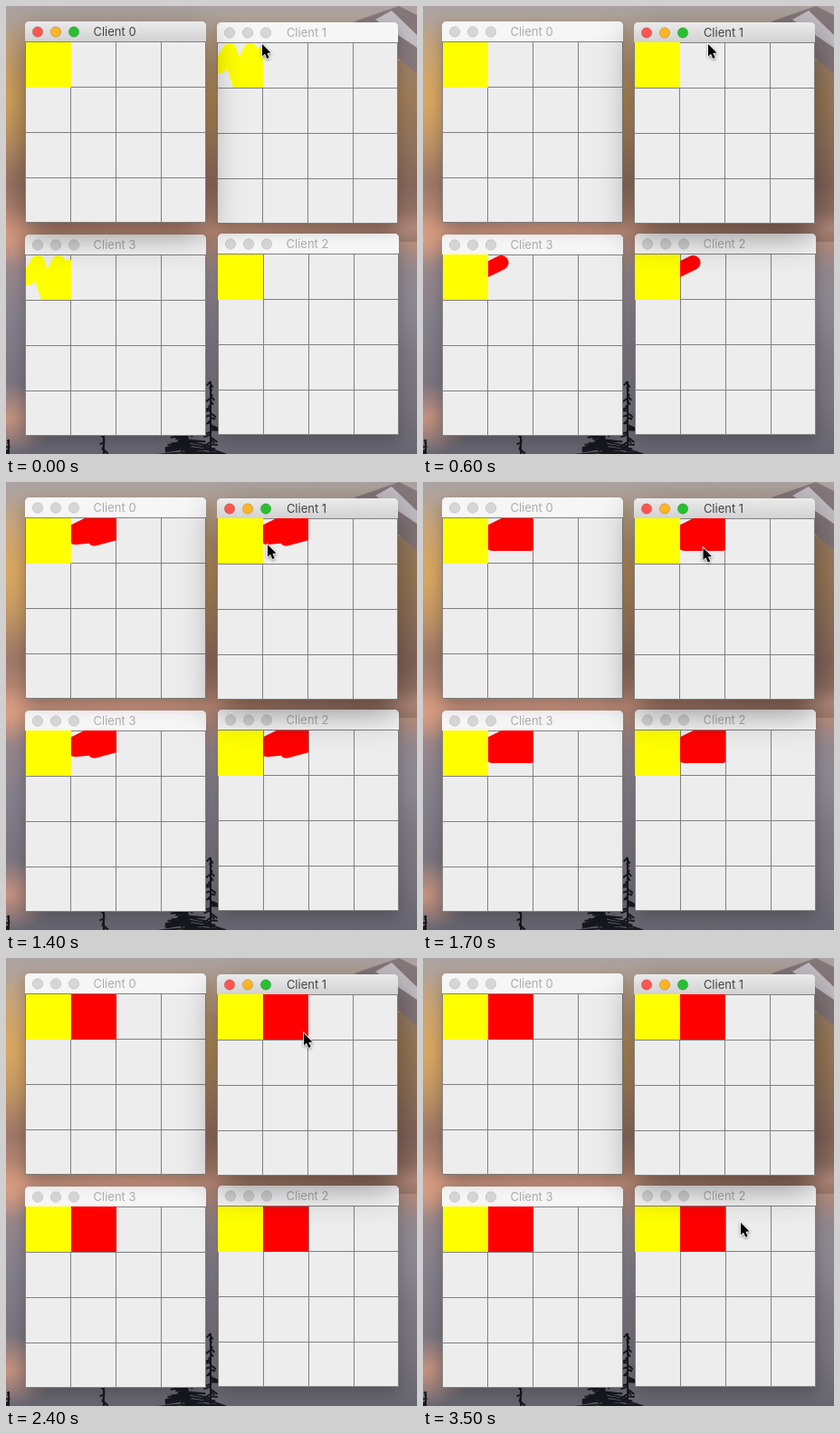
An HTML page with a canvas for the animation above (3600 ms loop, 454 by 494 pixels).

```html
<!DOCTYPE html>
<html lang="en">
<head>
<meta charset="utf-8">
<title>Shared drawing clients</title>
<style>
html, body { margin: 0; width: 100%; height: 100%; overflow: hidden; }
canvas { display: block; }
</style>
</head>
<body>
<canvas id="stage" width="454" height="494"></canvas>
<script>
const W = 454, H = 494, LOOP = 3600, STEP = 100;
const CELL = 50, SIZE = CELL * 4, BAR = 22, BRUSH = 16;
const PRESS_AT = 400, REPAINT_AT = 700, FILL_AT = 2300, LAG = 100;
const ctx = document.getElementById('stage').getContext('2d');

// dx, dy: where the cell fill starts, on or just after the grid line
const clients = [
  { x: 21, y: 17, dx: 1, dy: 1 },
  { x: 233, y: 18, dx: 1, dy: 0 },
  { x: 234, y: 251, dx: 0, dy: 1 },
  { x: 21, y: 252, dx: 1, dy: 0 }
];

// Pointer stops { t, x, y } relative to the red cell: approach, zigzag, leave
const stop = (t, x, y) => ({ t, x, y });
const stops = [stop(0, -1, 1), stop(PRESS_AT, -2, 17), stop(600, 31, 1)];
for (let i = 0; i < 7; i++) {
  const row = i >> 1;
  stops.push(i % 2
    ? stop(800 + 200 * i, 5, 21 + 7 * row)
    : stop(800 + 200 * i, 46, 6 + 11 * row));
}
stops.push(stop(2400, 45, 42), stop(3000, 77, 240), stop(LOOP, 65, 253));

const scribble = [[3, 26], [13, 9], [22, 40], [36, 9], [24, 46], [48, 14], [44, 49], [30, 47]];

function pointer(t) {
  const i = Math.max(1, stops.findIndex(s => s.t >= t));
  const a = stops[i - 1], b = stops[i], u = (t - a.t) / (b.t - a.t);
  return [a.x + (b.x - a.x) * u, a.y + (b.y - a.y) * u];
}

function trail(t) {
  const passed = stops.filter(s => s.t >= PRESS_AT && s.t <= t);
  return [...passed.map(s => [s.x, s.y]), pointer(t)];
}

function trace(points) {
  ctx.beginPath();
  points.forEach(p => ctx.lineTo(...p));
}

function polygon(points, color) {
  trace(points);
  ctx.closePath();
  ctx.fillStyle = color;
  ctx.fill();
}

function brush(points, color) {
  trace(points);
  ctx.lineWidth = BRUSH;
  ctx.lineCap = ctx.lineJoin = 'round';
  ctx.strokeStyle = color;
  ctx.stroke();
}

function gradient(x, y, x2, y2, colors) {
  const g = ctx.createLinearGradient(x, y, x2, y2);
  colors.forEach((c, i) => g.addColorStop(i / (colors.length - 1), c));
  return g;
}

function glow(x, y, rx, ry, rgb) {
  ctx.save();
  ctx.translate(x, y);
  ctx.scale(rx, ry);
  const g = ctx.createRadialGradient(0, 0, 0, 0, 0, 1);
  g.addColorStop(0, `rgba(${rgb},.8)`);
  g.addColorStop(1, `rgba(${rgb},0)`);
  ctx.fillStyle = g;
  ctx.fillRect(-1, -1, 2, 2);
  ctx.restore();
}

// Fir shape: random twigs that widen from the tip downwards
function tree(x, top, spread, twigs) {
  let seed = x;
  const random = () => (seed = seed * 16807 % 2147483647) / 2147483647;
  ctx.beginPath();
  ctx.moveTo(x, top);
  ctx.lineTo(x, H);
  for (let i = 0; i < twigs; i++) {
    const y = top + (H - top) * i / twigs;
    const reach = (random() * 2 - 1) * spread * (.3 + i / twigs);
    ctx.moveTo(x, y);
    ctx.lineTo(x + reach, y + random() * 6);
  }
  ctx.lineWidth = 2;
  ctx.lineCap = 'butt';
  ctx.strokeStyle = '#17181f';
  ctx.stroke();
}

function backdrop() {
  ctx.fillStyle = gradient(0, 0, 0, H, ['#aaa3a3', '#c2a382', '#c79a62', '#b58c66', '#a07868',
    '#c29079', '#95868c', '#85808b', '#7d7782', '#76727d', '#666570']);
  ctx.fillRect(0, 0, W, H);
  ctx.fillStyle = gradient(200, 0, W, 0, ['rgba(92,76,74,0)', 'rgba(92,76,74,.4)']);
  ctx.fillRect(0, 60, W, 200);
  glow(5, 100, 45, 80, '222,172,98');
  glow(0, 255, 45, 32, '226,162,130');
  glow(140, 245, 110, 18, '208,152,130');
  glow(450, 245, 40, 20, '182,140,126');
  glow(448, 320, 45, 60, '142,138,148');
  glow(0, 455, 60, 40, '222,156,126');
  polygon([[385, 17], [434, 0], [W, 10], [W, 75]], '#85777a');
  polygon([[408, 15], [426, 5], [W, 32], [W, 46]], '#c3bec4');
  tree(226, 414, 14, 30);
  tree(200, 466, 38, 60);
  tree(108, 474, 8, 8);
  tree(3, 478, 5, 6);
}

function inCell(client, column, draw) {
  ctx.save();
  ctx.translate(column * CELL + client.dx, BAR + client.dy);
  ctx.beginPath();
  ctx.rect(0, 0, CELL, CELL);
  ctx.clip();
  draw();
  ctx.restore();
}

function fillCell(color) {
  ctx.fillStyle = color;
  ctx.fillRect(0, 0, CELL, CELL);
}

function drawFrame(active) {
  ctx.save();
  ctx.shadowColor = `rgba(0,0,0,${active ? .45 : .25})`;
  ctx.shadowBlur = active ? 38 : 18;
  ctx.shadowOffsetY = active ? 13 : 6;
  ctx.beginPath();
  ctx.roundRect(0, 0, SIZE, SIZE + BAR, [5, 5, 2, 2]);
  ctx.fillStyle = '#ededed';
  ctx.fill();
  ctx.restore();

  ctx.beginPath();
  ctx.roundRect(0, 0, SIZE, BAR, [5, 5, 0, 0]);
  ctx.fillStyle = active ? gradient(0, 0, 0, BAR, ['#ebebeb', '#d2d2d2']) : '#f6f6f6';
  ctx.fill();

  ['#fc5650', '#fdb424', '#28c032'].forEach((color, i) => {
    ctx.beginPath();
    ctx.arc(14 + 20 * i, 11.5, 5.7, 0, 7);
    ctx.fillStyle = active ? color : '#d6d6d6';
    ctx.fill();
    ctx.lineWidth = .8;
    ctx.strokeStyle = active ? 'rgba(0,0,0,.2)' : '#c4c4c4';
    ctx.stroke();
  });

  ctx.fillStyle = '#808080';
  for (let i = 0; i <= 4; i++) {
    const line = Math.min(i * CELL, SIZE - 1);
    ctx.fillRect(line, BAR, 1, SIZE);
    ctx.fillRect(0, BAR + line, SIZE, 1);
  }
}

function drawWindow(index, active, t) {
  const client = clients[index];
  ctx.save();
  ctx.translate(client.x, client.y);
  drawFrame(active);

  ctx.font = '13px Inter, sans-serif';
  ctx.textAlign = 'center';
  ctx.textBaseline = 'middle';
  ctx.fillStyle = active ? '#444' : '#acacac';
  ctx.fillText('Client ' + index, SIZE / 2 - 1, 12);

  // Odd clients receive the yellow fill one step late
  inCell(client, 0, () => index % 2 && t < STEP ? brush(scribble, '#ff0') : fillCell('#ff0'));
  inCell(client, 1, () => {
    const start = index < 2 ? REPAINT_AT : PRESS_AT + LAG;
    if (t >= FILL_AT) fillCell('#f00');
    else if (t >= start) brush(trail(t - LAG), '#f00');
  });
  ctx.restore();
}

function drawPointer(x, y) {
  const arrow = [[0, 0], [0, 13.5], [3, 10.8], [5.3, 16], [7.7, 15], [5.4, 9.9], [9.5, 9.6]];
  ctx.save();
  ctx.translate(x, y);
  ctx.shadowColor = 'rgba(0,0,0,.35)';
  ctx.shadowBlur = 3;
  ctx.shadowOffsetY = 1;
  polygon(arrow, '#000');
  ctx.lineWidth = 1.6;
  ctx.lineJoin = 'miter';
  ctx.strokeStyle = '#fff';
  ctx.stroke();
  ctx.shadowColor = 'transparent';
  polygon(arrow, '#000');
  ctx.restore();
}

function frame(now) {
  const t = Math.floor(now % LOOP / STEP) * STEP;
  const front = t < PRESS_AT ? 0 : 1;
  backdrop();
  [3, 2, 1 - front, front].forEach(i => drawWindow(i, i === front, t));
  const [x, y] = pointer(t);
  drawPointer(284 + x, 41 + y);
  requestAnimationFrame(frame);
}
requestAnimationFrame(frame);
</script>
</body>
</html>
```
